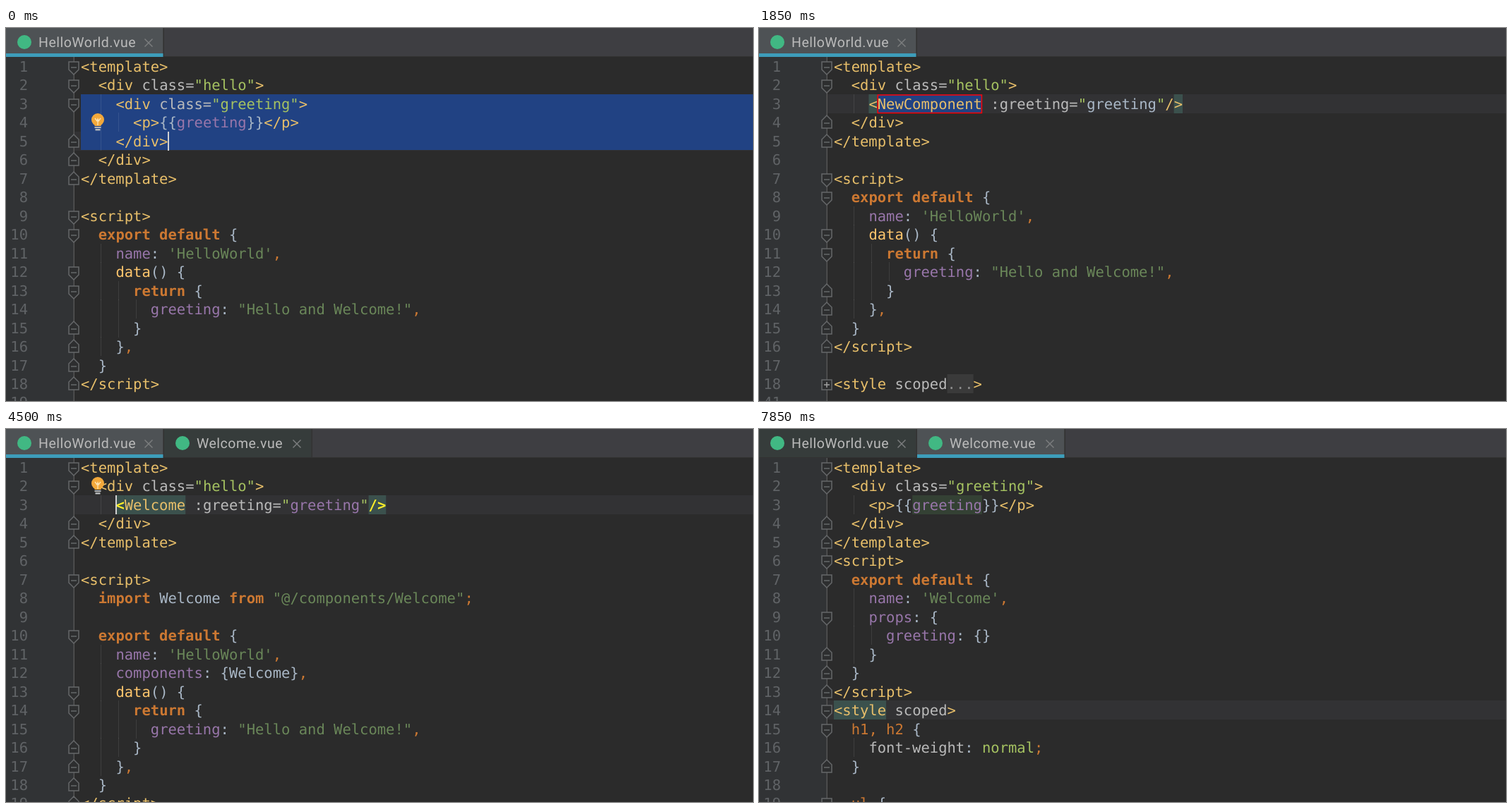
Animation, 1058 px wide and 529 px high, one loop 8 s. Source, as an HTML page with a canvas:

```html
<!DOCTYPE html>
<html lang="en">
<head>
<meta charset="utf-8">
<title>Extract component</title>
<style>
html, body { margin: 0; width: 100%; height: 100%; overflow: hidden; background: #2b2b2b; }
canvas { display: block; }
</style>
</head>
<body>
<canvas id="stage" width="1058" height="529"></canvas>
<script>
const ctx = document.getElementById('stage').getContext('2d');
const W = 1058, H = 529, LOOP = 8000;
const LEFT = 106, TOP = 41, CHAR = 12.35, ROW = 26.47;
const MONO = '20.5px "DejaVu Sans Mono", monospace';
const colX = col => LEFT + col * CHAR;
const rowY = row => Math.round(TOP + (row - 1) * ROW);

// style key -> [colour, background, bold]
const STYLES = {
  t: ['#e8bf6a'], a: ['#bababa'], v: ['#a5c261'], p: ['#9876aa'],
  x: ['#a9b7c6'], k: ['#cc7832', null, true], o: ['#cc7832'],
  s: ['#6a8759'], m: ['#ffc66d'],
  f: ['#8c8c8c', '#3a3a3a'],
  H: ['#e8bf6a', '#3b514d'],
  B: ['#ffef28', '#3b514d', true],
  P: ['#9876aa', '#344134'],
  S: ['#e8bf6a', '#214283'],
  R: ['#e8bf6a', '#4a2b2b']
};

// Lines are segments split by "|"; each segment starts with its style key.
const divHello = '  t<div |aclass=|v"hello"|t>';
const openScript = 't<' + 'script>', closeScript = 't<' + '/script>';
const closeHello = ['  t</div>', 't</template>', '', openScript];
const named = name => `    pname|x: |s'${name}'|o,`;
const exportLine = '  kexport default |x{';
const dataBlock = [
  '    mdata|x() {', '      kreturn |x{',
  '        pgreeting|x: |s"Hello and Welcome!"|o,',
  '      x}', '    x}|o,', '  x}', closeScript
];
const component = [exportLine, named('HelloWorld'), ...dataBlock];

const before = [
  't<template>', divHello,
  '    t<div |aclass=|v"greeting"|t>',
  '      t<p>|x{{|pgreeting|x}}|t</p>',
  '    t</div>', ...closeHello, ...component, ''
];
const naming = (name, key) => [
  't<template>', divHello,
  `    H<|${key}${name}|a :greeting=|v"|xgreeting|v"|t/|H>`,
  ...closeHello, ...component, '',
  't<style |ascoped|f...|t>', ''
];
const extracted = [
  't<template>', divHello,
  '    B<|HWelcome|a :greeting=|v"|pgreeting|v"|B/>',
  ...closeHello,
  '  kimport |xWelcome |kfrom |s"@/components/Welcome"|o;', '',
  exportLine, named('HelloWorld'), '    pcomponents|x: {Welcome}|o,', ...dataBlock
];
const created = [
  't<template>', '  t<div |aclass=|v"greeting"|t>',
  '    t<p>|x{{|Pgreeting|x}}|t</p>',
  '  t</div>', 't</template>', openScript,
  exportLine, named('Welcome'), '    pprops|x: {', '      pgreeting|x: {}',
  '    x}', '  x}', closeScript,
  'H<style|a scoped|t>',
  '  oh1, h2 |x{', '    afont-weight|x: |vnormal|o;', '  x}', '', '  oul |x{'
];

function rect(color, x, y, w, h) {
  ctx.fillStyle = color;
  ctx.fillRect(x, y, w, h);
}
function path(points, fill, stroke, width = 1.5) {
  ctx.beginPath();
  points.forEach(([x, y]) => ctx.lineTo(x, y));
  if (fill) { ctx.closePath(); ctx.fillStyle = fill; ctx.fill(); }
  if (stroke) { ctx.strokeStyle = stroke; ctx.lineWidth = width; ctx.stroke(); }
}
function disc(color, x, y, r) {
  ctx.fillStyle = color;
  ctx.beginPath();
  ctx.arc(x, y, r, 0, 7);
  ctx.fill();
}
function label(str, x, y, color, font, spacing = 0) {
  ctx.font = font;
  ctx.letterSpacing = spacing + 'px';
  ctx.fillStyle = color;
  ctx.fillText(str, x, y);
}

function tab(x, w, name, selected, focused) {
  rect(selected ? '#4e5255' : '#363c3b', x, 0, w, 40);
  rect('#323232', x + w, 0, 1.5, 40);
  if (selected) rect(focused ? '#3d9dba' : '#47808a', x, 36, w, 5);
  disc('#41b883', x + 26, 20, 10);
  label(name, x + 46, 27, '#bbbbbb', '19.5px Roboto, sans-serif', 0.5);
  const c = x + w - 20.5;
  path([[c - 5.5, 15.5], [c + 5.5, 26.5]], null, '#7b7d7e');
  path([[c + 5.5, 15.5], [c - 5.5, 26.5]], null, '#7b7d7e');
}

function foldMark(plain, y) {
  const box = (...pts) => path([...pts, pts[0]], '#2d2e2f', '#66686a');
  const mid = y + 15;
  if (plain.includes('...')) {
    box([89, mid - 7], [103, mid - 7], [103, mid + 7], [89, mid + 7]);
    path([[96, mid - 4], [96, mid + 4]], null, '#a0a0a0');
    path([[92, mid], [100, mid]], null, '#a0a0a0');
    return;
  }
  if (/^<\w[^/]*>$|\{$/.test(plain)) {
    box([89, y + 7], [103, y + 7], [103, y + 18], [96, y + 25], [89, y + 18]);
  } else if (/^(<\/|\})/.test(plain)) {
    box([89, y + 22], [103, y + 22], [103, y + 11], [96, y + 4], [89, y + 11]);
  } else return;
  path([[92, mid], [100, mid]], null, '#66686a');
}

function codeLine(line, row, number) {
  const y = rowY(row), base = y + 21;
  label(number, 31 - String(number).length * CHAR, base, '#606366', MONO);
  const indent = line.search(/\S|$/);
  for (let c = 2; c < indent; c += 2) rect('rgba(255,255,255,.09)', Math.floor(colX(c)) + 4, y, 1, 27);
  let col = indent, plain = '';
  for (const seg of line.trimStart().split('|')) {
    const [color, back, bold] = STYLES[seg[0]] || [];
    const str = seg.slice(1), x = colX(col), w = str.length * CHAR;
    if (back) rect(back, x, y, w, 27);
    if (str) label(str, x, base, color, (bold ? 'bold ' : '') + MONO);
    if (/^[SR]/.test(seg)) {
      ctx.strokeStyle = '#ff0000';
      ctx.lineWidth = 1.5;
      ctx.strokeRect(x + 0.5, y + 1, w - 1, 25.5);
    }
    col += str.length;
    plain += str;
  }
  foldMark(plain, y);
}

function bulb(row) {
  const y = rowY(row);
  disc('#f2a83b', 130, y + 10, 9);
  rect('#f2a83b', 125.5, y + 15, 9, 4);
  path([[126, y + 8], [129, y + 12], [130, y + 9], [131, y + 12], [134, y + 8]], null, '#fbe3b4', 1.3);
  path([[130, y + 11], [130, y + 18]], null, '#fbe3b4', 1.3);
  rect('#b5b8ba', 125.5, y + 20, 9, 2);
  rect('#b5b8ba', 126.5, y + 23, 7, 2.5);
}

function menuItem(y, str, color, arrow) {
  for (let i = 0; i < 5; i++) rect('#a4a8ab', 245 + i, y + 6 + i * 3, 16 - i * 3, 1.6);
  path([[248, y + 26], [250, y + 19], [261, y + 9], [266, y + 14], [255, y + 24]], '#59b552');
  path([[248, y + 26], [250, y + 19], [255, y + 24]], '#e9dcc0');
  path([[253, y + 19], [263, y + 10]], null, '#9bdc8d');
  label(str, 277, y + 24, color, '23px Roboto, sans-serif', 0.75);
  path([[591, y + 9], [602, y + 15.5], [591, y + 22]], arrow);
}
function menu() {
  ctx.save();
  ctx.shadowColor = 'rgba(0,0,0,.5)';
  ctx.shadowBlur = 8;
  ctx.shadowOffsetY = 3;
  rect('#3e4042', 229.5, 175, 389.5, 69);
  ctx.restore();
  rect('#2e63cb', 229.5, 175.5, 389.5, 33.5);
  menuItem(176, 'Extract Vue Component', '#ffffff', '#ffffff');
  menuItem(210, 'Inject language or reference', '#bbbbbb', '#939699');
}

function sceneAt(t) {
  if (t < 1850) return {
    lines: before, row: 5, col: t < 500 && 10,
    select: true, bulb: t < 800 && 4, menu: t >= 800 && t < 1750
  };
  if (t < 4150) {
    const typed = [2650, 2850, 2950, 3100, 3250, 3400, 3550].filter(k => t >= k).length;
    const name = typed ? 'Welcome'.slice(0, typed) : 'NewComponent';
    const caretOn = typed || (t >= 1900 && t < 2400);
    return {
      lines: naming(name, typed ? 'R' : 'S'), row: 3,
      col: caretOn && 5 + name.length, folded: true
    };
  }
  if (t < 6750) {
    const blinks = [4800, 5250, 5800, 6300].filter(k => t >= k).length;
    return { lines: extracted, row: 3, col: blinks % 2 === 0 && 4, bulb: t >= 4500 && 2, tabs: 2 };
  }
  return { lines: created, row: 14, col: t >= 7350 && t < 7850 && 13, tabs: 2, second: true };
}

function draw(t) {
  const s = sceneAt(t);
  ctx.textRendering = 'geometricPrecision';
  rect('#2b2b2b', 0, 0, W, H);
  rect('#313335', 0, TOP, 96, H);
  rect('#323234', 97, rowY(s.row), W, 27);
  rect('#555555', 95.5, TOP, 1.5, H);
  if (s.select) rect('#214283', LEFT, rowY(3), W, rowY(6) - rowY(3));
  s.lines.slice(0, 19).forEach((line, i) =>
    codeLine(line, i + 1, s.folded && i === 18 ? 41 : i + 1));
  if (s.bulb) bulb(s.bulb);
  if (s.col) rect('#d0d0d0', Math.floor(colX(s.col)), rowY(s.row), 2, 27);

  rect('#3e3e42', 0, 0, W, 40);
  rect('#323232', 0, 40, W, 1);
  tab(0, 222.5, 'HelloWorld.vue', !s.second, !s.menu);
  if (s.tabs) tab(224, 208.5, 'Welcome.vue', s.second, true);
  if (s.menu) menu();
}

function tick() {
  draw(performance.now() % LOOP);
  requestAnimationFrame(tick);
}
tick();
</script>
</body>
</html>
```
